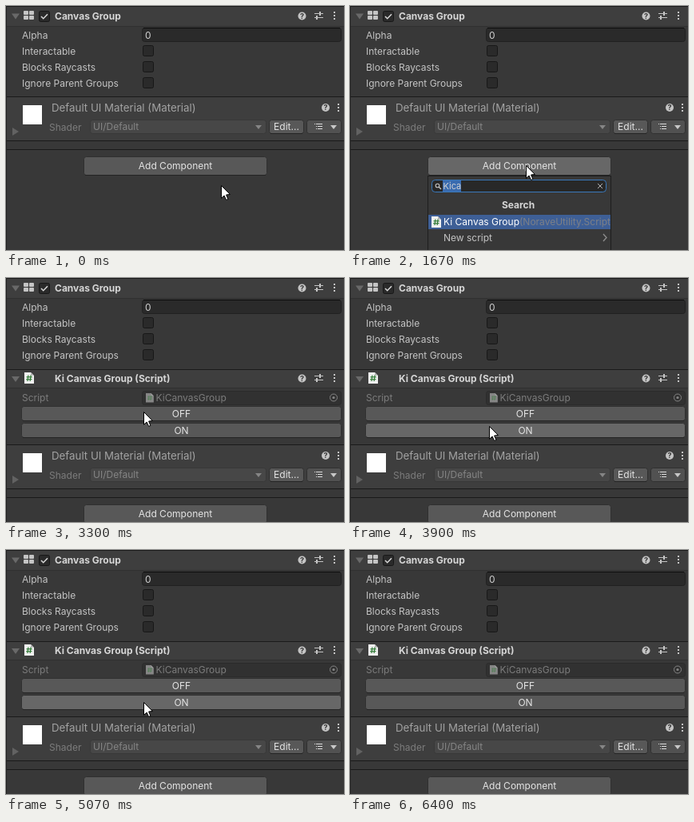
Recreate the animation shown at these times as an HTML page with a canvas. Size 423x305 px, loop 7030 ms.

```html
<!DOCTYPE html>
<html lang="en">
<head>
<meta charset="utf-8">
<title>Inspector</title>
<style>
html, body { margin: 0; width: 100%; height: 100%; overflow: hidden; background: #383838; }
canvas { display: block; }
</style>
</head>
<body>
<canvas id="stage" width="423" height="305"></canvas>
<script>
const g = document.getElementById('stage').getContext('2d');
const LOOP = 7030;
const W = 423, H = 305;
const NORMAL = '#585858', HOVER = '#676767', PRESSED = '#46607c';
const LABEL = '#c4c4c4', TITLE = '#d6d6d6', DIM = '#7c7c7c', LINE = '#1a1a1a';

// Pointer path: time, x, y; eased between stops.
const PATH = [
  [0, 269, 224], [270, 220, 199],
  [1670, 220, 199], [1850, 227, 226], [2100, 177, 268],
  [2850, 177, 268], [3080, 161, 212], [3300, 172, 167],
  [3710, 172, 167], [3890, 174, 185],
  [4310, 174, 185], [4520, 174, 173],
  [4800, 174, 173], [5030, 172, 189], [5070, 172, 190],
  [5330, 172, 190], [5590, 173, 173],
  [5870, 173, 173], [6400, 190, 306]
];
const ALPHA_ON = [[4130, 4790], [5330, 5870]];
const ADD_DOWN = [[300, 470]];
const OFF_DOWN = [[3570, 3730], [4630, 4790], [5700, 5870]];
const ON_DOWN = [[3970, 4130], [5170, 5330]];

const within = (t, spans) => spans.some(([a, b]) => t >= a && t < b);

function pointer(t) {
  for (let i = 1; i < PATH.length; i++) {
    const [t0, x0, y0] = PATH[i - 1], [t1, x1, y1] = PATH[i];
    if (t < t1) {
      const u = (t - t0) / (t1 - t0), k = u * u * (3 - 2 * u);
      return { x: Math.round(x0 + (x1 - x0) * k), y: Math.round(y0 + (y1 - y0) * k) };
    }
  }
  return null;
}

function rect(x, y, w, h, color) {
  g.fillStyle = color;
  g.fillRect(x, y, w, h);
}

function box(x, y, w, h, fill, edge, r = 3) {
  g.beginPath();
  g.roundRect(x + .5, y + .5, w - 1, h - 1, r);
  g.fillStyle = fill;
  g.fill();
  g.strokeStyle = edge;
  g.lineWidth = 1;
  g.stroke();
}

function text(s, x, y, color = LABEL, { size = 12, weight = 400, align = 'left' } = {}) {
  g.font = `${weight} ${size}px Inter, sans-serif`;
  g.textAlign = align;
  g.fillStyle = color;
  g.fillText(s, x, y);
}

function poly(points, fill) {
  g.beginPath();
  points.forEach(([x, y]) => g.lineTo(x, y));
  g.closePath();
  g.fillStyle = fill;
  g.fill();
}

function stroke(points, color, width = 1) {
  g.beginPath();
  points.forEach(([x, y]) => g.lineTo(x, y));
  g.strokeStyle = color;
  g.lineWidth = width;
  g.stroke();
}

function circle(x, y, r, color) {
  g.beginPath();
  g.arc(x, y, r, 0, Math.PI * 2);
  g.fillStyle = color;
  g.fill();
}

function button(label, x, y, w, h, fill) {
  box(x, y, w, h, fill, '#303030');
  rect(x + 2, y + h - 1, w - 4, 1, '#242424');
  text(label, x + w / 2, y + h / 2 + 4, '#e4e4e4', { align: 'center' });
}

function help(x, y) {
  circle(x, y, 5, LABEL);
  text('?', x, y + 3.4, '#333', { size: 9, weight: 700, align: 'center' });
}

function kebab(x, y) {
  for (const d of [-5, -1, 3]) rect(x - 1, y + d, 2, 2, LABEL);
}

function sliders(x, y) {
  rect(x - 5, y - 3, 11, 1, LABEL);
  rect(x + 1, y - 5, 2, 5, LABEL);
  rect(x - 5, y + 2, 11, 1, LABEL);
  rect(x - 3, y, 2, 5, LABEL);
}

function headerIcons(y) {
  help(370.5, y);
  sliders(391, Math.floor(y));
  kebab(411, Math.floor(y));
}

function foldDown(x, y) {
  poly([[x - 5, y - 3], [x + 5, y - 3], [x, y + 4]], '#696969');
}

function caret(x, y, color) {
  poly([[x - 4, y - 2], [x + 4, y - 2], [x, y + 3]], color);
}

function header(y, h) {
  rect(1, y, W - 1, h, '#3e3e3e');
  rect(1, y, W - 1, 1, LINE);
  rect(1, y + h, W - 1, 1, '#303030');
}

function checkbox(x, y, on) {
  box(x, y, 14, 14, '#2a2a2a', '#171717', 2);
  if (on) stroke([[x + 3, y + 7], [x + 5.7, y + 9.7], [x + 11, y + 4.3]], '#d8d8d8', 1.5);
}

function scriptIcon(x, y, scale = 1) {
  g.save();
  g.translate(x, y);
  g.scale(scale, scale);
  poly([[0, 0], [8, 0], [12, 4], [12, 14], [0, 14]], '#f0f0f0');
  poly([[8, 0], [8, 4], [12, 4]], '#b9b9b9');
  const green = '#2f7a35';
  stroke([[4.9, 3.5], [4, 11]], green, 1.2);
  stroke([[8, 3.5], [7.1, 11]], green, 1.2);
  stroke([[2.5, 5.8], [9.8, 5.8]], green, 1.2);
  stroke([[2.2, 8.7], [9.5, 8.7]], green, 1.2);
  g.restore();
}

function canvasGroup(on) {
  header(0, 25);
  foldDown(12, 12.5);
  for (const x of [22, 29]) for (const y of [6, 12]) {
    g.beginPath();
    g.roundRect(x, y, 6, 5, 1);
    g.fillStyle = LABEL;
    g.fill();
  }
  checkbox(41, 6, true);
  text('Canvas Group', 61, 17, TITLE, { weight: 700 });
  headerIcons(12.5);
  text('Alpha', 20, 41);
  box(170, 27, 250, 18, '#2a2a2a', '#212121');
  rect(172, 27, 246, 1, '#0d0d0d');
  text(on ? '1' : '0', 174, 41, '#d2d2d2');
  ['Interactable', 'Blocks Raycasts', 'Ignore Parent Groups'].forEach((label, i) => {
    text(label, 20, 61 + i * 20);
    checkbox(171, 49 + i * 20, on && i < 2);
  });
}

function scriptGroup(offFill, onFill) {
  rect(1, 113, W - 1, 1, '#383838');
  header(114, 23);
  foldDown(12, 126);
  scriptIcon(23, 118);
  text('Ki Canvas Group (Script)', 61, 130, TITLE, { weight: 700 });
  headerIcons(125.5);
  text('Script', 20, 154, DIM);
  box(170, 141, 250, 18, '#313131', '#2b2b2b');
  g.globalAlpha = .45;
  scriptIcon(175, 144, .82);
  g.globalAlpha = 1;
  text('KiCanvasGroup', 187.5, 154, DIM);
  g.beginPath();
  g.arc(410, 149.5, 4.5, 0, Math.PI * 2);
  g.strokeStyle = '#858585';
  g.lineWidth = 1;
  g.stroke();
  circle(410, 149.5, 1.6, '#858585');
  button('OFF', 19, 160, 401, 19, offFill);
  button('ON', 19, 181, 401, 19, onFill);
}

function material(y) {
  rect(1, y, W - 1, 55, '#3e3e3e');
  rect(1, y, W - 1, 1, LINE);
  rect(1, y + 55, W - 1, 1, LINE);
  rect(21, y + 11, 24, 24, '#fff');
  poly([[8, y + 39], [8, y + 49], [16, y + 44]], '#626262');
  text('Default UI Material (Material)', 57, y + 19, '#a2a2a2', { size: 13.3 });
  help(400, y + 14);
  kebab(416, y + 14);
  text('Shader', 54, y + 43, DIM);
  box(105, y + 29, 221, 18, '#474747', '#383838');
  text('UI/Default', 109, y + 42, '#858585');
  caret(316, y + 38, '#858585');
  button('Edit...', 329, y + 29, 44, 18, NORMAL);
  box(376, y + 29, 44, 18, '#515151', '#303030');
  for (const [i, x] of [[0, 386], [1, 388], [2, 388]]) {
    rect(x, y + 34 + i * 3, 1, 1, '#ddd');
    rect(x + 2, y + 34 + i * 3, 396 - x - 2, 1, '#ddd');
  }
  caret(410, y + 38, '#c8c8c8');
}

function popup() {
  rect(97, 212, 230, H - 212, '#1e1e1e');
  rect(98, 213, 228, H - 213, '#383838');
  box(102, 217, 219, 16, '#282828', '#3a79bb', 4);
  g.beginPath();
  g.arc(109.5, 224.5, 2.3, 0, Math.PI * 2);
  g.strokeStyle = LABEL;
  g.lineWidth = 1.1;
  g.stroke();
  stroke([[111, 226], [114, 229]], LABEL, 1.4);
  rect(116, 218, 23, 14, '#3a6cb0');
  text('Kica', 116.5, 229, '#d2d2d2', { size: 11 });
  stroke([[310, 222], [316, 228]], '#b4b4b4');
  stroke([[316, 222], [310, 228]], '#b4b4b4');
  text('Search', 210.5, 253, TITLE, { weight: 700, align: 'center' });
  g.save();
  g.beginPath();
  g.rect(98, 213, 228, H - 213);
  g.clip();
  rect(98, 261, 228, 18, '#3e5f96');
  scriptIcon(102, 263);
  const name = 'Ki Canvas Group';
  text(name, 117, 274, '#fff');
  text('(NoraveUtility.Scripts)', 117 + g.measureText(name).width, 274, '#7d8088');
  text('New script', 117, 294);
  stroke([[317, 285], [321, 289.5], [317, 294]], '#8c8c8c', 1.4);
  g.restore();
}

function arrow({ x, y }) {
  g.save();
  g.translate(x, y);
  const shape = [[.5, .5], [.5, 16.3], [4.1, 13], [6.6, 18.4], [8.9, 17.5], [6.6, 12], [11.4, 11.5]];
  poly(shape, '#fff');
  stroke([...shape, shape[0]], '#000', 1);
  g.restore();
}

function draw(t) {
  const p = pointer(t);
  const added = t >= 2570;
  const fill = (x, y, w, h, down, live) => {
    if (within(t, down)) return PRESSED;
    const over = live && p && p.x >= x && p.x < x + w && p.y >= y && p.y < y + h;
    return over ? HOVER : NORMAL;
  };

  rect(0, 0, W, H, '#383838');
  const on = within(t, ALPHA_ON);
  canvasGroup(on);
  if (added) {
    const live = t >= 3470;
    scriptGroup(fill(19, 160, 401, 20, OFF_DOWN, live), fill(19, 181, 401, 19, ON_DOWN, live));
  }
  material(added ? 208 : 113);

  // The footer settles one tick after the component is added.
  const shift = !added ? 0 : t < 2600 ? 89 : 95;
  rect(1, 179 + shift, W - 1, 1, LINE);
  const opened = t >= 470 && t < 2570;
  const addFill = opened ? HOVER : fill(97, 188, 230, 24, ADD_DOWN, !added);
  button('Add Component', 97, 188 + shift, 230, 24, addFill);
  if (t >= 470 && t < 2430) popup();
  rect(0, 0, 1, H, '#202020');
  if (p) arrow(p);
}

const start = performance.now();
function tick() {
  draw((performance.now() - start) % LOOP);
  requestAnimationFrame(tick);
}
tick();
</script>
</body>
</html>
```
